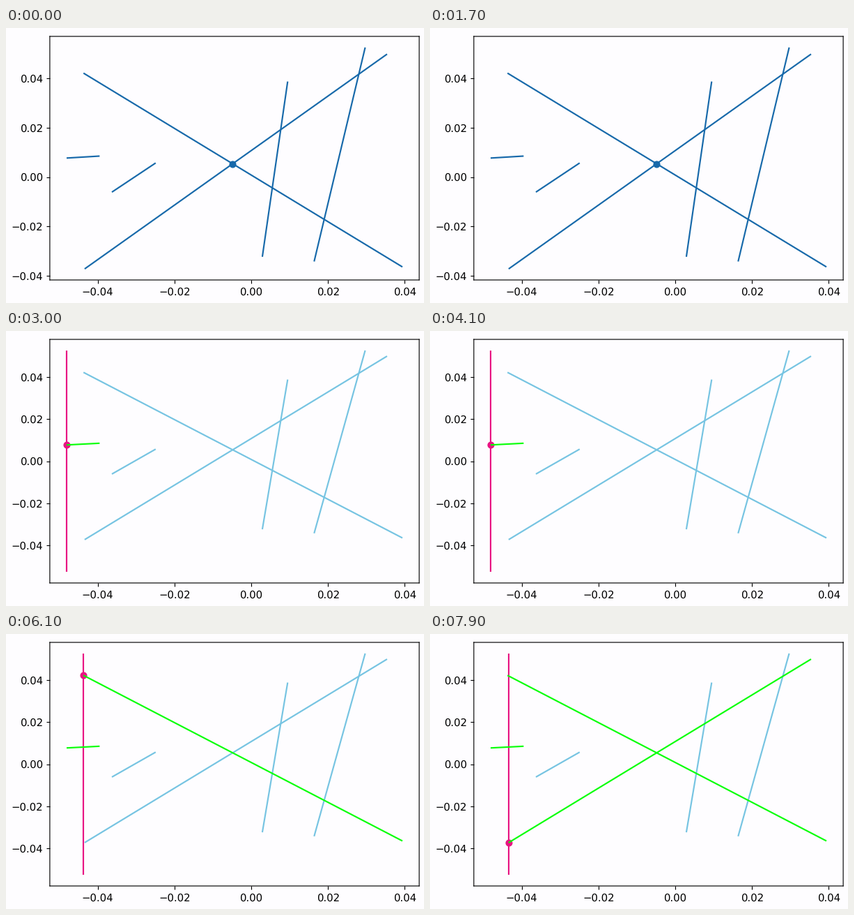
Write a matplotlib script that moves like this. It is 600 px wide and 394 px high and loops after 8 s.

```python
import matplotlib.pyplot as plt
import numpy as np
from matplotlib.animation import FuncAnimation
from matplotlib.collections import LineCollection
from matplotlib.ticker import MultipleLocator

W, H, DPI = 600, 394, 100
K = 1.04  # scale of line weights and ticks
FRAMES, INTERVAL = 80, 100
FIRST, STEP = 18, 12  # frame of the first event, frames per stage

BACK = "#fefdff"
NAVY, SKY, PINK, LIME = "#1769aa", "#76c4e2", "#e81583", "#0aff0a"

# the two long crossing segments and four short ones, from left end to right
FALL = (-0.0437, 0.0421), (0.0394, -0.0364)
RISE = (-0.0434, -0.0372), (0.0354, 0.0498)
SHORT = [
    ((-0.0481, 0.0077), (-0.0395, 0.0085)),
    ((-0.0363, -0.0061), (-0.0249, 0.0057)),
    ((0.0029, -0.0323), (0.0095, 0.0387)),
    ((0.0164, -0.0342), (0.0297, 0.0525)),
]
# the sweep meets the segments in order of their left ends
SEGMENTS = sorted([FALL, RISE, *SHORT])
LOW = np.min(SEGMENTS, axis=(0, 1))
HIGH = np.max(SEGMENTS, axis=(0, 1))


def crossing(first, second):
    a, b, c, d = map(np.array, (*first, *second))
    t, _ = np.linalg.solve(np.column_stack([b - a, c - d]), c - a)
    return a + t * (b - a)


def padded(low, high):
    margin = 0.05 * (high - low)
    return low - margin, high + margin


plt.rcParams.update({
    "font.family": "DejaVu Sans",
    "font.size": 10.7,
    "text.hinting": "none",
    "axes.linewidth": 0.8 * K,
})
for axis in ("xtick", "ytick"):
    plt.rcParams.update({
        f"{axis}.major.size": 3.5 * K,
        f"{axis}.major.pad": 3.5 * K,
        f"{axis}.major.width": 0.8 * K,
    })

fig = plt.figure(figsize=(W / DPI, H / DPI), dpi=DPI, facecolor=BACK)
left, right, top, bottom = 62.9, 593.1, 12, 361
ax = fig.add_axes([left / W, 1 - bottom / H,
                   (right - left) / W, (bottom - top) / H], facecolor=BACK)
ax.set_xlim(*padded(LOW[0], HIGH[0]))
for axis in (ax.xaxis, ax.yaxis):
    axis.set_major_locator(MultipleLocator(0.02))
for spine in ax.spines.values():
    spine.set_snap(False)


def add_lines(color):
    lines = LineCollection([], colors=color, linewidths=1.5 * K)
    ax.add_collection(lines, autolim=False)
    return lines


dot = ax.scatter([0], [0], s=36 * K * K, linewidths=K, zorder=1)
idle, sweep, active = map(add_lines, (SKY, PINK, LIME))


def show(point, dot_color, line_color, lit, sweeps, floor):
    dot.set_offsets([point])
    dot.set_color(dot_color)
    idle.set_segments(SEGMENTS[lit:])
    idle.set_color(line_color)
    active.set_segments(SEGMENTS[:lit])
    sweep.set_segments(sweeps)
    ax.set_ylim(*padded(floor, HIGH[1]))


def update(frame):
    if frame < FIRST:
        show(crossing(FALL, RISE), NAVY, NAVY, 0, [], LOW[1])
    else:
        # each event: the sweep line arrives, then its segment lights up
        stage = (frame - FIRST) // STEP
        x, y = SEGMENTS[stage // 2][0]
        line = (x, -HIGH[1]), (x, HIGH[1])
        show((x, y), PINK, SKY, (stage + 1) // 2, [line], -HIGH[1])
    return dot, idle, sweep, active


def init():
    return update(0)


anim = FuncAnimation(fig, update, frames=FRAMES, init_func=init,
                     interval=INTERVAL, repeat=True, repeat_delay=0,
                     blit=False)
plt.show()
```
